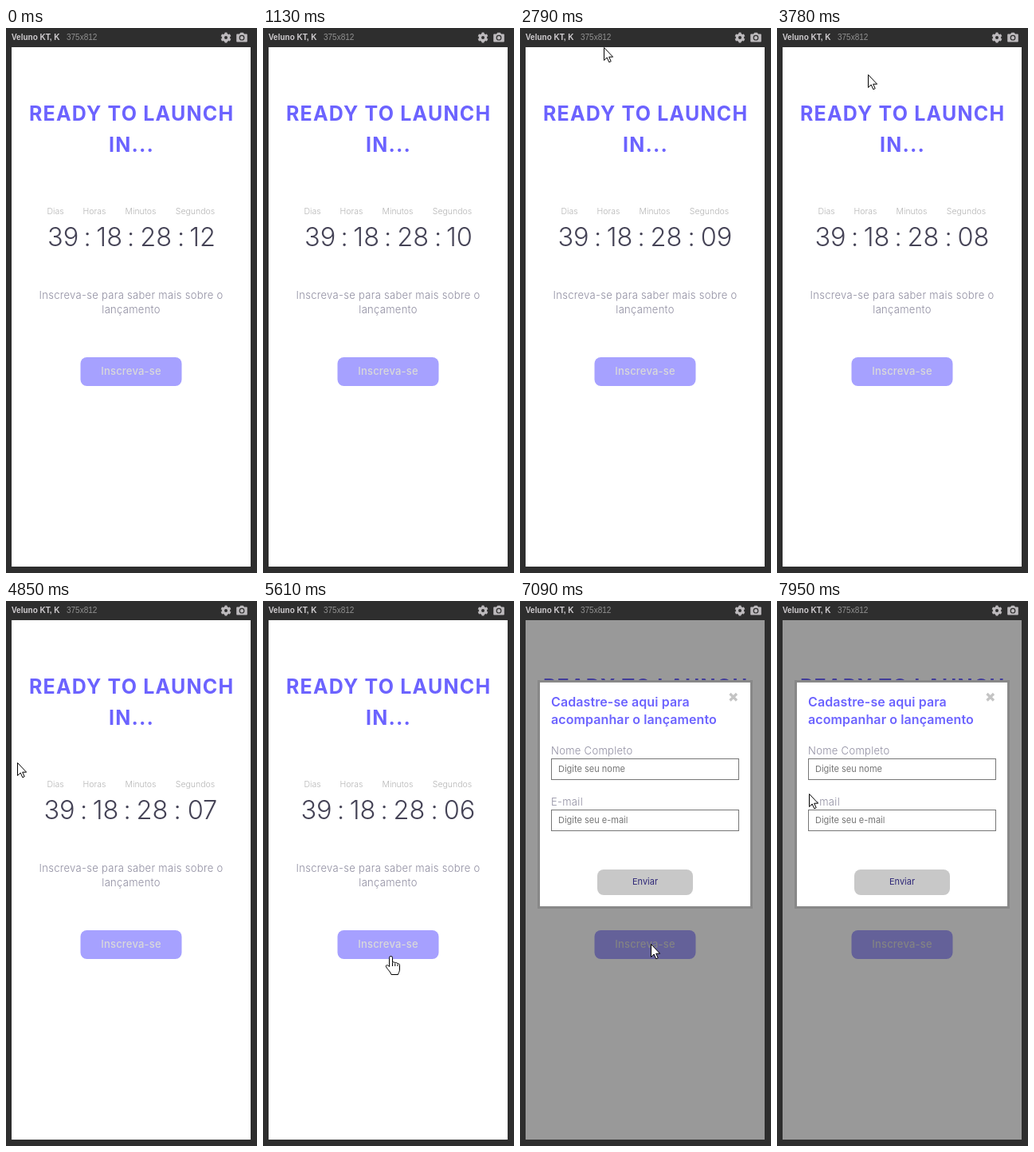
Animation of 315x682 px, one loop 8000 ms. Source, as an HTML page:

```html
<!DOCTYPE html>
<html lang="pt">
<head>
<meta charset="utf-8">
<title>Countdown</title>
<style>
html, body { margin: 0; width: 100%; height: 100%; overflow: hidden; background: #2e2e2e; }
svg { display: block; font-family: Inter, "Open Sans", sans-serif; }
.mid { text-anchor: middle; }
.bar { font: 10px "Liberation Sans", Arial, sans-serif; }
.title { font-size: 25px; font-weight: 650; letter-spacing: 1.2px; fill: #6c63ff; }
.label { font-size: 10.5px; font-weight: 300; fill: #b5b5b5; }
.digits { font-size: 32.5px; font-weight: 350; fill: #454356; }
.body { font-size: 13px; font-weight: 350; letter-spacing: .3px; fill: #8f8da0; }
.head { font-size: 16px; font-weight: 600; letter-spacing: .1px; fill: #6c63ff; }
.hint { font-size: 11px; fill: #757575; }
.field { fill: #fff; stroke: #767676; }
</style>
</head>
<body>
<svg width="315" height="682" viewBox="0 0 315 682">
  <rect width="315" height="682" fill="#2e2e2e"/>
  <g class="bar">
    <text x="7" y="15" font-weight="bold" fill="#d0cdd0">Veluno KT, K</text>
    <text x="76" y="15" fill="#929292">375x812</text>
  </g>
  <g fill="none" stroke="#bdbabd">
    <circle cx="276" cy="12" r="3.6" stroke-width="3.2"/>
    <circle cx="276" cy="12" r="5.4" stroke-width="2.2" pathLength="12" stroke-dasharray="1.1 .9" stroke-dashoffset="1.55"/>
  </g>
  <path d="M290 7.5h3l1.3-1.8h3.4l1.3 1.8h3q.8 0 .8.8v8.4q0 .8-.8.8h-12q-.8 0-.8-.8v-8.4q0-.8.8-.8z" fill="#bdbabd"/>
  <circle cx="296" cy="12.2" r="2.8" fill="#bdbabd" stroke="#2e2e2e" stroke-width="1.2"/>

  <rect x="7" y="24" width="300" height="650" fill="#fff"/>
  <g class="title mid">
    <text x="157.6" y="116">READY TO LAUNCH</text>
    <text x="157.6" y="155">IN...</text>
  </g>
  <g class="label mid">
    <text x="62" y="233">Dias</text>
    <text x="111" y="233">Horas</text>
    <text x="169" y="233">Minutos</text>
    <text x="237.5" y="233">Segundos</text>
  </g>
  <g class="digits mid">
    <g id="fixed">
      <text x="67" y="273">39</text><text x="97.5" y="273">:</text>
      <text x="125" y="273">18</text><text x="152" y="273">:</text>
      <text x="183.5" y="273">28</text><text x="215" y="273">:</text>
    </g>
    <text id="seconds" x="246.5" y="273"></text>
  </g>
  <g class="body mid">
    <text x="157" y="339">Inscreva-se para saber mais sobre o</text>
    <text x="157" y="357">lançamento</text>
  </g>
  <rect id="button" x="93.5" y="412" width="127" height="36" rx="8" fill="#6c63ff"/>
  <text id="caption" class="mid" x="157" y="434" font-size="13" font-weight="500" letter-spacing=".2">Inscreva-se</text>

  <g id="modal">
    <rect x="7" y="24" width="300" height="650" opacity=".4"/>
    <rect x="23.5" y="100.5" width="267" height="283" fill="#fff" stroke="#888" stroke-width="3"/>
    <g class="head">
      <text x="39" y="132">Cadastre-se aqui para</text>
      <text x="39" y="154">acompanhar o lançamento</text>
    </g>
    <path d="M263.5 116l8.5 8.5m0-8.5l-8.5 8.5" stroke="#c4c4c4" stroke-width="3.2"/>
    <text class="body" x="39" y="192">Nome Completo</text>
    <rect class="field" x="39.5" y="197.5" width="235" height="26"/>
    <text class="hint" x="48" y="214">Digite seu nome</text>
    <text class="body" x="39" y="256">E-mail</text>
    <rect class="field" x="39.5" y="261.5" width="235" height="26"/>
    <text class="hint" x="48" y="278">Digite seu e-mail</text>
    <rect x="97" y="336" width="120" height="32" rx="8" fill="#c8c8c8"/>
    <text class="mid" x="157" y="355" font-size="11" fill="#2f2878">Enviar</text>
  </g>

  <g id="cursor" fill="#fff" stroke="#000" stroke-linejoin="round">
    <path id="arrow" d="M.5.5V16.5L4.2 13L6.8 18.8L9.2 17.7L6.7 12.2H11.6Z"/>
    <g id="hand">
      <path d="M-1.5 2.5a2 2 0 0 1 4 0V8.5a2 2 0 0 1 3.3.5a2 2 0 0 1 3.2 1a1.7 1.7 0 0 1 2.5 1.5V17C11.5 20 10 21 9.5 23.5H1C0 20-3 18-5.5 13.8c-1-2.5 2-3 4-.2z"/>
      <path d="M2.5 9v4M5.8 9.5v3.5M9 10.5v2.5" fill="none"/>
    </g>
  </g>
  <circle id="click" cx="164" cy="429" r="12" fill="#ff0" opacity=".5"/>
</svg>
<script>
const LOOP = 8000, HOVER = 5610, CLICK = 6930, OPEN = 7090;
const el = Object.fromEntries([...document.querySelectorAll("[id]")].map(e => [e.id, e]));
const show = (e, on) => e.setAttribute("display", on ? "inline" : "none");
const clamp = v => Math.max(0, Math.min(1, v));

// each pointer move follows one curve from start to end
const moves = [
  [1200, 1900, "M296 120Q150 60 48 37"],
  [1900, 2790, "M48 37C-20 20 30 0 105 24"],
  [2790, 3780, "M105 24C-30 60-20-60 54 46L114 58"],
  [4500, HOVER, "M114 58C20 140-20 250 10 350S100 520 160 444"],
  [HOVER, 5810, "M160 444L164 429"],
  [7530, 7950, "M164 429Q60 300 40 241"]
].map(([start, end, d]) => {
  const curve = document.createElementNS("http://www.w3.org/2000/svg", "path");
  curve.setAttribute("d", d);
  return { start, end, curve, length: curve.getTotalLength() };
});

function pointerAt(t) {
  const move = moves.findLast(m => t >= m.start) || moves[0];
  const k = clamp((t - move.start) / (move.end - move.start));
  return move.curve.getPointAtLength(k * move.length);
}

function draw(t) {
  const left = t < 200 ? 12 : 10 - Math.floor((t - 1130) / 1028);
  const digits = String(left).padStart(2, "0");
  const ones = digits.split("1").length - 1;
  el.seconds.textContent = digits;
  // a narrow "1" pulls the row inwards
  el.fixed.setAttribute("transform", `translate(${ones * 4.7} 0)`);

  const open = t >= OPEN;
  const hover = open ? 0 : clamp((t - HOVER) / 200);
  const grey = 217 + 38 * hover;
  el.button.setAttribute("fill-opacity", 0.6 + 0.4 * hover);
  el.caption.setAttribute("fill", `rgb(${grey},${grey},${grey})`);
  show(el.modal, open);

  const { x, y } = pointerAt(t);
  const hand = t >= HOVER - 50 && t < CLICK + 70;
  el.cursor.setAttribute("transform", `translate(${Math.round(x)} ${Math.round(y)})`);
  show(el.cursor, t >= moves[0].start);
  show(el.hand, hand);
  show(el.arrow, !hand);
  show(el.click, t >= CLICK && !open);
}

const start = performance.now();
function frame() {
  draw((performance.now() - start) % LOOP);
  requestAnimationFrame(frame);
}
frame();
</script>
</body>
</html>
```
